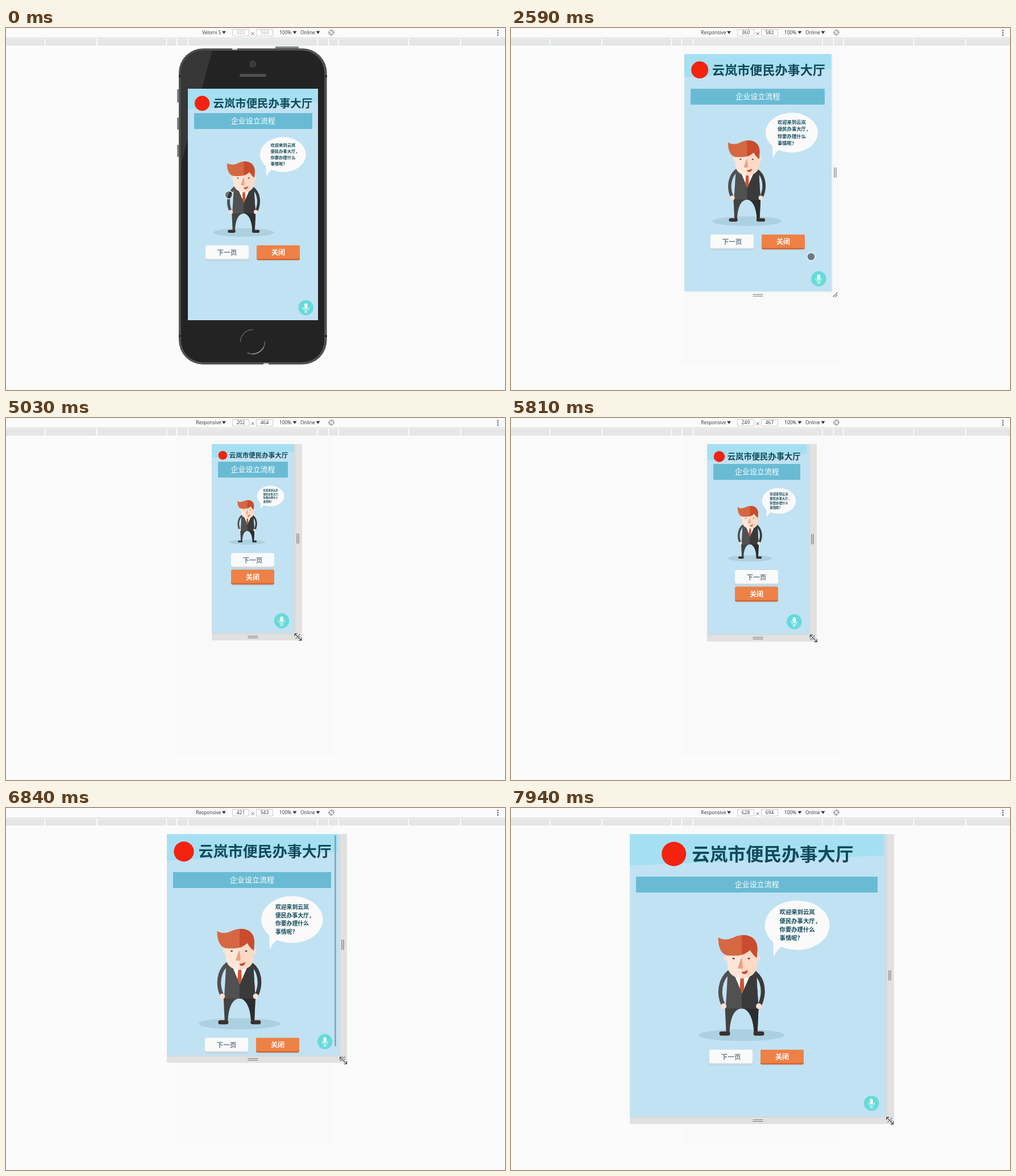
An HTML page for the animation above (8 s loop, 878 by 638 pixels).

```html
<!DOCTYPE html>
<html lang="zh">
<head>
<meta charset="utf-8">
<title>Responsive preview</title>
<style>
html, body { margin: 0; width: 100%; height: 100%; overflow: hidden; background: #fbfbfb; }
svg { display: block; }
#stage { width: 100vw; height: 100vh; }
.ui { font: 8.4px "Open Sans", "Noto Sans", sans-serif; fill: #333; }
.cjk { font-family: "Noto Sans CJK SC", "Noto Sans CJK", sans-serif; }
.b { font-weight: 700; }
.mid { text-anchor: middle; }
</style>
</head>
<body>
<svg id="stage" viewBox="0 0 878 638">
  <defs>
    <clipPath id="half"><rect x="410.5" y="200" width="60" height="220"/></clipPath>
    <clipPath id="body"><rect x="307" y="39" width="254" height="551" rx="40"/></clipPath>
    <path id="hair" d="M369 226C382 233 391 228 400 224C417 218 438 223 438 246L437 262Q430 257 425 248Q414 258 400 258H388C374 257 369 243 369 226Z"/>
    <path id="face" d="M385 252L424 246L437 254V274C437 289 425 298 411 298C398 298 386 290 385 276Z"/>
    <path id="legs" d="M381 350H440L438 394H432C431 364 420 351 411 351C399 351 390 364 389 394H383Z"/>
    <path id="suit" d="M397 291L388 283C385 290 385 304 384 320L382 351H440L438 320C437 304 437 290 434 284L426 291L411 325Z"/>
    <path id="resize" d="M-5 -5L5 5M-6 -1V-6H-1M6 1V6H1"/>
  </defs>

  <rect width="878" height="638" fill="#fbfbfb"/>
  <rect y="17" width="878" height="1" fill="#d0d0d0"/>
  <rect y="19" width="878" height="12" fill="#e4e7e5"/>
  <path id="ticks" stroke="#fff" stroke-width="1.6"/>

  <g class="ui">
    <text id="device" y="11.3" text-anchor="end" x="378.5"></text>
    <text x="481" y="11.3">100%</text>
    <text x="518" y="11.3">Online</text>
    <path d="M380 5.5h7l-3.5 5zM504.500 5.500h7l-3.5 5zM545.500 5.500h7l-3.5 5z"/>
    <path d="M398.500 2.500h29v11.500h-29zM440.500 2.500h29v11.500h-29z" fill="#fff" stroke="#cbcbcb"/>
    <text id="numW" class="mid" x="413" y="11.3"></text>
    <text id="numH" class="mid" x="455" y="11.3"></text>
    <path d="M431.500 7.500l5 5m0-5l-5 5" stroke="#966" fill="none"/>
    <g transform="translate(572.5 8)" fill="none" stroke="#555" stroke-width=".9">
      <rect x="-2" y="-4" width="4" height="8" rx="1" transform="rotate(-45)"/>
      <path d="M-1 -4.500A4.600 4.600 0 0 1 4.500 1M1 4.500A4.600 4.600 0 0 1 -4.500 -1"/>
    </g>
    <path d="M864.500 3.500h2v2h-2zM864.500 7.500h2v2h-2zM864.500 11.500h2v2h-2z"/>
  </g>

  <g id="phone">
    <path d="M301 108h4v23h-4zM301 158h4v21h-4zM301 206h4v21h-4zM474 32.500h41v4h-41z" fill="#808285"/>
    <rect x="304" y="36" width="260.500" height="557" rx="43" fill="#4b4d4e"/>
    <path d="M398 36h9v2.500h-9zM453 590.500h9v2.500h-9z" fill="#d5d5d5"/>
    <path d="M304 83h4v4h-4zM560.500 83h4v4h-4zM304 541h4v4h-4zM560.500 541h4v4h-4z" fill="#171717"/>
    <rect x="307" y="39" width="254" height="551" rx="40" fill="#232323" stroke="#747678" stroke-width=".8"/>
    <path d="M304 36H364L308 240H304Z" fill="#373737" clip-path="url(#body)"/>
    <circle cx="434" cy="63.500" r="5" fill="#2a2a2a" stroke="#515151" stroke-width="1.400"/>
    <circle cx="434" cy="63.500" r="2" fill="none" stroke="#555"/>
    <rect x="411" y="81" width="47" height="5" rx="2.500" fill="#505050"/>
    <g fill="none" stroke-width="1.500" stroke-linecap="round">
      <path d="M412.500 553A21.500 21.500 0 0 1 434 531.500" stroke="#606060"/>
      <path d="M455.500 553A21.500 21.500 0 0 1 425 572.500" stroke="#6a6a6a"/>
      <path d="M453 563A21.500 21.500 0 0 1 434 574.500" stroke="#999"/>
    </g>
  </g>

  <g id="frame">
    <rect x="300.500" y="31" width="277" height="562" fill="#f9f9f9"/>
    <rect id="grip"/>
    <rect id="shade" fill="#000" opacity=".04"/>
    <path id="lines" stroke="#777" stroke-width="1.200" fill="none"/>
  </g>

  <svg id="page" class="cjk">
    <rect width="100%" height="100%" fill="#c1e2f3"/>
    <path id="band" fill="#a5e0f2"/>
    <g id="head">
      <circle cx="23" cy="24" r="21.500" fill="#f4230f"/>
      <text class="b" x="54.500" y="35.700" font-size="31.600" fill="#124a59">云岚市便民办事大厅</text>
    </g>
    <rect id="bar" height="28" fill="#69bbd4"/>
    <text id="barText" class="mid" font-size="13" fill="#fff">企业设立流程</text>

    <g id="scene">
      <ellipse cx="410.500" cy="398" rx="75.500" ry="10.500" fill="#abd1e1"/>
      <ellipse cx="508" cy="204.500" rx="57" ry="43.500" fill="#fafafa"/>
      <path d="M465 230C467 242 465 250 467 260Q472 247 483 240Z" fill="#fafafa"/>
      <g class="b" font-size="10.350" fill="#124a59">
        <text x="477" y="185">欢迎来到云岚</text>
        <text x="477" y="200.400">便民办事大厅，</text>
        <text x="477" y="215.800">你要办理什么</text>
        <text x="477" y="231">事情呢？</text>
      </g>
      <use href="#legs" fill="#434343"/>
      <use href="#legs" fill="#2d2d2d" clip-path="url(#half)"/>
      <g fill="#3d302f">
        <rect x="371" y="391.500" width="19" height="7.500" rx="3.700"/>
        <rect x="431" y="391.500" width="19" height="7.500" rx="3.700"/>
      </g>
      <g fill="none" stroke-width="7">
        <path d="M389 286C371 300 369 326 378 345" stroke="#505050"/>
        <path d="M432 287C450 300 451 326 442 345" stroke="#3a3a3a"/>
      </g>
      <path d="M395 287H428L411 326Z" fill="#fbfbfb"/>
      <path d="M408 297H414L414.500 316L411 325L407 316Z" fill="#d5502f"/>
      <use href="#suit" fill="#515151"/>
      <use href="#suit" fill="#3a3a3a" clip-path="url(#half)"/>
      <g fill="#fde0d1">
        <circle cx="378.500" cy="347" r="5"/><circle cx="440.500" cy="347" r="5"/>
        <circle cx="383.500" cy="263" r="4.500"/><circle cx="438" cy="263" r="4.500"/>
      </g>
      <use href="#face" fill="#fde5d8"/>
      <use href="#face" fill="#fdd9c6" clip-path="url(#half)"/>
      <use href="#hair" fill="#d56843"/>
      <use href="#hair" fill="#c94c2f" clip-path="url(#half)"/>
      <ellipse cx="396" cy="263" rx="2" ry="1.400" fill="#443"/>
      <ellipse cx="423" cy="263" rx="2" ry="1.400" fill="#443"/>
      <path d="M409 263L404 278Q403 281 406 281H412.500L411 263Z" fill="#e6a583"/>
      <path d="M410 286.500Q416 287 421 283Q421 290 415 290.500Q411 290 410 286.500Z" fill="#c8472b"/>
    </g>

    <g id="next">
      <rect y="3" width="76" height="24.500" rx="3" fill="#b2d2e2"/>
      <rect width="76" height="26" rx="3" fill="#d5dbdf"/>
      <rect width="76" height="23.800" rx="3" fill="#fafafa"/>
      <text class="b mid" x="38" y="17" font-size="11.700" fill="#6d7e8b">下一页</text>
    </g>
    <g id="close">
      <rect y="3" width="76" height="24.500" rx="3" fill="#b6d0de"/>
      <rect width="76" height="26" rx="3" fill="#d2622c"/>
      <rect width="76" height="23.800" rx="3" fill="#ee8145"/>
      <text class="b mid" x="38" y="17" font-size="12" fill="#fff">关闭</text>
    </g>
    <g id="mic">
      <circle cy=".5" r="13.300" fill="#9fd3df"/>
      <circle r="13" fill="#64dcda"/>
      <rect x="-2.700" y="-7.500" width="5.400" height="10" rx="2.700" fill="#f2fbfb"/>
      <path d="M-5 -1V0A5 5 0 0 0 5 0V-1M0 5V8M-3 8H3" fill="none" stroke="#e6f8f8" stroke-width="1.200"/>
    </g>
    <rect id="scroll" y="2" width="2.500" rx="1.200" fill="#55788a" opacity=".6"/>
  </svg>

  <g id="menu" class="ui"></g>
  <g id="cursor">
    <circle id="touch" r="7" fill="#141414" fill-opacity=".5" stroke="#f4f4f4" stroke-width="1.300"/>
    <path id="arrow" d="M0 0V12L2.800 9.500L4.600 13.500L6.300 12.700L4.600 8.900H8.500Z" fill="#fff" stroke="#222" stroke-width=".8"/>
    <g id="drag" fill="none">
      <use href="#resize" stroke="#fff" stroke-width="2.600"/>
      <use href="#resize" stroke="#222" stroke-width="1.100"/>
    </g>
  </g>
</svg>
<script>
const LOOP = 8000, K = 0.7177, CX = 434.4;
const PICK = 2290, GRAB = 2950, LAG = 22;
const $ = id => document.getElementById(id);
const set = (id, attrs) => { for (const k in attrs) $(id).setAttribute(k, attrs[k]); };
const show = (id, on) => set(id, { display: on ? 'inline' : 'none' });
const move = (id, x, y, s = 1) => set(id, { transform: `translate(${x} ${y}) scale(${s})` });
const smooth = p => p * p * (3 - 2 * p);
const { round, min, max } = Math;

// Keys are [time, x, y, eased]
const sizes = [
  [3070, 360, 582], [3600, 216, 563, 1], [4250, 216, 563], [5030, 202, 464, 1],
  [5090, 202, 464], [5390, 200, 462, 1], [5570, 200, 462], [6360, 360, 478],
  [6380, 360, 478], [7180, 466, 591], [7280, 478, 604], [7940, 628, 694]
];
const path = [
  [70, 392, 294], [230, 378, 266, 1], [560, 699, 345, 1], [830, 506, 398, 1],
  [920, 506, 398], [1630, 372, 10, 1], [1750, 372, 10], [2110, 366, 25, 1],
  [PICK, 366, 25], [2590, 528, 403], [GRAB, 571, 470, 1]
];

function at(keys, t) {
  let a = keys[0];
  for (const b of keys) {
    if (t < b[0]) {
      if (a === b) break;
      let p = (t - a[0]) / (b[0] - a[0]);
      if (b[3]) p = smooth(p);
      return [a[1] + (b[1] - a[1]) * p, a[2] + (b[2] - a[2]) * p];
    }
    a = b;
  }
  return [a[1], a[2]];
}

const sizeAt = t => t < PICK ? [320, 568] : at(sizes, t);

const rows = ['Responsive', '', 'Orvane S5', 'Kestia 5X', 'Kestia 6P', 'Velomi 5',
  'Velomi 6', 'Velomi 6 Max', 'Tabrio', '', 'Edit...'];
const rowH = 248 / rows.length;
$('menu').innerHTML =
  '<rect x="322.5" y="14.500" width="102" height="248" fill="#fff" stroke="#aaa"/>' +
  `<rect id="pick" x="323" width="101" height="${rowH}" fill="#1e90ff"/>` +
  rows.map((s, i) => {
    const y = 14.5 + rowH * (i + 0.5);
    return s ? `<text x="328" y="${y + 3}">${s}</text>` : `<path d="M323 ${y}h101" stroke="#ccc"/>`;
  }).join('');

set('ticks', {
  d: [68.5, 160, 282.5, 300.5, 320.5, 548, 567.5, 585, 708.5, 800].map(x => `M${x} 19V31`).join('')
});

function layout(lw, lh, h) {
  const inner = lw - 22;
  const headW = min(inner, 338), headH = headW * 0.143;
  const barY = round(11 + headH + (lw < 340 * K ? 2 : 16));
  const sceneW = min(inner * 0.785, 230), s = sceneW / 230;
  const mid = lw / 2;
  const sceneX = mid + sceneW * 0.07 - max(0, lw - 342) * 0.03 - sceneW / 2;
  const sceneY = barY + 42.3;
  const btnY = round(sceneY + 248 * s + 14.5);
  const stacked = lw < 196;

  set('band', { d: `M0 0H${lw}V${headH * 0.78}L0 ${headH + 7}Z` });
  move('head', mid - headW / 2, 11, headW / 338);
  set('bar', { x: 11, y: barY, width: round(inner) });
  set('barText', { x: mid, y: barY + 18.3 });
  move('scene', sceneX - 335 * s, sceneY - 161 * s, s);
  move('next', round(mid - (stacked ? 38.5 : 83.5)), btnY);
  move('close', round(mid + (stacked ? -38.5 : 6.5)), stacked ? btnY + 29.5 : btnY);
  move('mic', lw - 22, lh - 22);

  const full = btnY + (stacked ? 55.5 : 26) + 22;
  show('scroll', full > h);
  set('scroll', { x: lw - 5, height: max(10, (h * h) / full - 1) });
}

function draw(t) {
  const free = t >= PICK;
  const [cw, ch] = sizeAt(t), [ow, oh] = sizeAt(free ? max(PICK, t - LAG) : t);
  const w = cw * K, h = ch * K, y = free ? 46 : 107;
  const x = round(CX - w / 2), right = round(CX + w / 2), bottom = round(y + h);

  show('phone', !free);
  show('frame', free);
  $('device').textContent = free ? 'Responsive' : 'Velomi 5';
  $('numW').textContent = round(cw);
  $('numH').textContent = round(ch);
  const ink = free ? '#333' : '#aaa';
  set('numW', { style: `fill:${ink}` });
  set('numH', { style: `fill:${ink}` });

  set('page', { x, y, width: right - x, height: bottom - y });
  layout(ow * K, oh * K, h);

  set('grip', { x, y, width: right - x + 14, height: bottom - y + 13, fill: t >= GRAB ? '#e1e1e1' : '#f9f9f9' });
  set('shade', { x: x + 1, y: y + 1, width: right - x + 1, height: bottom - y + 1 });
  const my = y + h / 2;
  set('lines', {
    d: `M${right + 5} ${my - 9}v18m3 0v-18M${CX - 9} ${bottom + 5.5}h18m0 3h-18` +
       `M${right + 2.5} ${bottom + 10}l8 -8m0 4l-4 4`
  });

  // While dragging, the pointer runs ahead of the resized page
  let [px, py] = at(path, t);
  if (t >= 3070) {
    const [aw, ah] = at(sizes, t + LAG);
    px = CX + aw * K / 2 + 7;
    py = y + ah * K + 7;
  }
  const inside = px > x && px < right && py > y && py < bottom;
  move('cursor', px, py);
  show('drag', t >= GRAB);
  show('touch', t < GRAB && inside);
  show('arrow', t < GRAB && !inside);

  show('menu', t >= 1750 && t < PICK);
  set('pick', { y: 14.5 + rowH * (py > 15 ? 0 : 5), opacity: 0.35 });
}

const start = performance.now();
function tick() {
  draw((performance.now() - start) % LOOP);
  requestAnimationFrame(tick);
}
draw(0);
requestAnimationFrame(tick);
</script>
</body>
</html>
```
